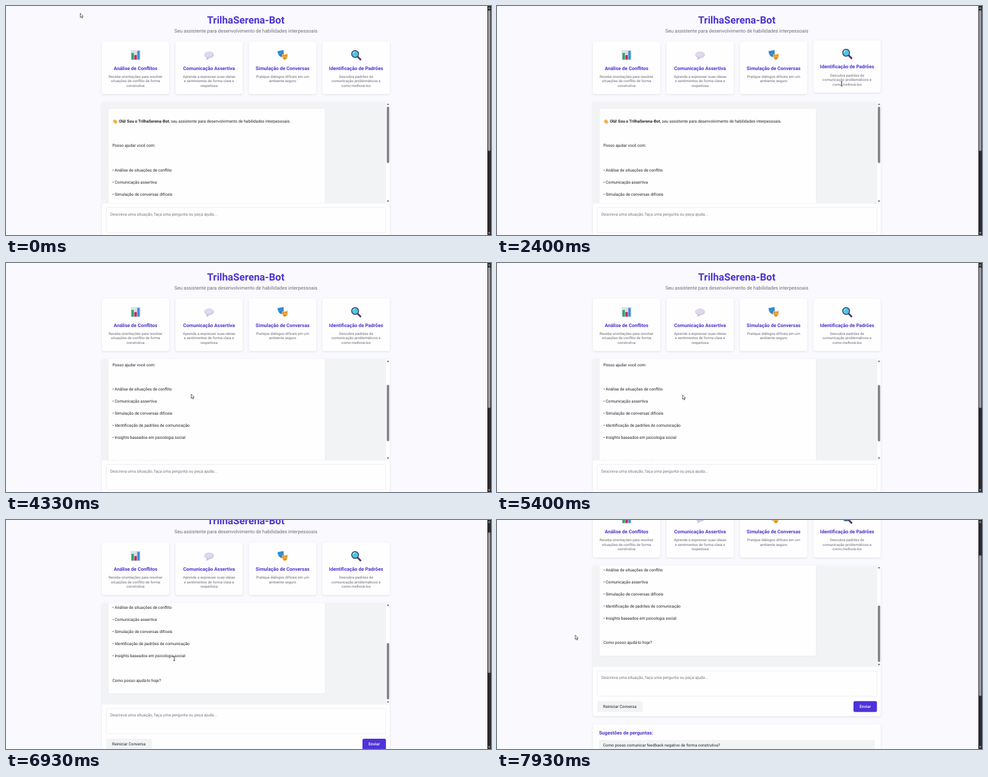
These frames come from a looping animation (800x379 px, 8 s). An HTML page:

```html
<!DOCTYPE html>
<html lang="pt-BR">
<head>
<meta charset="utf-8">
<title>Assistente</title>
<style>
  html, body { margin: 0; width: 100%; height: 100%; overflow: hidden; background: #faf9fe; }
  svg { display: block; }
  text { font: 6.667px Roboto, sans-serif; fill: #202126; text-rendering: geometricPrecision; white-space: pre; }
  .mid { text-anchor: middle; }
  .title { font-size: 16.667px; font-weight: 700; fill: #4c34d0; }
  .sub { font-size: 8px; fill: #6d6d76; }
  .head { font-size: 8px; font-weight: 700; fill: #4c34d0; }
  .desc { font-size: 6px; fill: #6d6d76; }
  .hint { fill: #76767c; }
  .send { fill: #fff; font-weight: 500; }
  .bold { font-weight: 700; }
  .box { fill: #fefeff; filter: drop-shadow(0 1.2px 1.4px rgba(30, 30, 60, .13)); }
  .grey { fill: #f1f3f4; }
  .line { fill: #fefeff; stroke: #e5e5ec; stroke-width: .6; }
</style>
</head>
<body>
<svg id="stage" width="800" height="379" viewBox="0 0 800 379"></svg>
<script>
const LOOP = 8000, STEP = 1000 / 15;
const LEFT = 158.1, WIDTH = 475, MID = 395.6;
const NOTCH = 31.4, CHAT_MAX = 104.8;

const rect = (x, y, w, h, r, cls, extra = '') =>
  `<rect x="${x}" y="${y}" width="${w}" height="${h}" rx="${r}" class="${cls}" ${extra}/>`;
const text = (x, y, s, cls = '') => `<text x="${x}" y="${y}" class="${cls}">${s}</text>`;
const tri = (x, y, d, fill) => `<path d="M${x - 2} ${y + d}h4l-2 ${-2.4 * d}z" fill="${fill}"/>`;

// Icons are drawn around their own centre.
const icons = [
  `<rect x="-8" y="-8.3" width="16" height="16.6" rx="1" fill="#dfe1e8"/>
   <path d="M-8-3h16M-8 2.5h16" stroke="#c3c8d3" stroke-width=".6"/>
   <rect x="-6.8" y="-3.5" width="4" height="11" fill="#2fa866"/>
   <rect x="-2" y="0" width="4" height="7.5" fill="#c8265d"/>
   <rect x="2.8" y="-7" width="4" height="14.5" fill="#3d8fdb"/>`,
  `<path d="M-3.5 3.5L-5 8L1 5z" fill="#c3b8d6"/>
   <ellipse cy="-.3" rx="8" ry="5.6" fill="#d5cbe4"/>
   <ellipse cx="-.6" cy="-1.2" rx="6.5" ry="4" fill="#e0d9ec"/>`,
  `<path d="M-8.5-6.5Q-4-7.5 1.5-8.5Q3.5 1-1.5 3.5Q-7.5 2-8.5-6.5z" fill="#3c93d6"/>
   <path d="M-6-3.7q1.2-1.2 2.3-.4M-2-4.5q1-1.2 2-.5M-4.7 0q2 .8 3.7-1.7" fill="none" stroke="#1c4d86" stroke-width=".9"/>
   <path d="M-1-1.5Q4-.8 8.5-2.5Q9.2 6.5 3.5 8.6Q-1.5 6-1-1.5z" fill="#f5b047"/>
   <path d="M.8 1.6q1-1 2 0M4.8 1.4q1-1 2-.2M1.8 5.6q2-2 4 0" fill="none" stroke="#8c5416" stroke-width=".9"/>`,
  `<path d="M3 3L7.2 7.3" stroke="#4d3a78" stroke-width="3" stroke-linecap="round"/>
   <circle cx="-1.6" cy="-1.8" r="5.7" fill="#4fc3e8" stroke="#37475c" stroke-width="1.5"/>
   <path d="M-5-2.5q.7-2.6 3.2-3" fill="none" stroke="#c9f0fb" stroke-width="1.1"/>`
];

const cards = [
  ['Análise de Conflitos', 'Receba orientações para resolver', 'situações de conflito de forma', 'construtiva'],
  ['Comunicação Assertiva', 'Aprenda a expressar suas ideias', 'e sentimentos de forma clara e', 'respeitosa'],
  ['Simulação de Conversas', 'Pratique diálogos difíceis em um', 'ambiente seguro'],
  ['Identificação de Padrões', 'Descubra padrões de', 'comunicação problemáticos e', 'como melhorá-los']
];

const card = ([head, ...lines], i) => {
  const x = LEFT + i * 121.25, c = x + 55.6;
  return `<g class="card">${rect(x, 58.8, 111.25, 86.9, 3.3, 'box')}
    <g transform="translate(${c} 81.2)">${icons[i]}</g>
    ${text(c, 105.5, head, 'mid head')}
    ${lines.map((s, n) => text(c, 119 + n * 7.4, s, 'mid desc')).join('')}</g>`;
};

// Message lines sit on a 20.06 px grid; the key is the row.
const message = {
  2: 'Posso ajudar você com:',
  4: '• Análise de situações de conflito',
  5: '• Comunicação assertiva',
  6: '• Simulação de conversas difíceis',
  7: '• Identificação de padrões de comunicação',
  8: '• Insights baseados em psicologia social',
  10: 'Como posso ajudá-lo hoje?'
};
const row = n => 193.3 + n * 20.06;

const chat = `<g id="chat">
  ${rect(168.6, 169.3, 358, 244.6, 2.5, 'line')}
  <path d="M176 190.5l1.2-.8 1-1.6 1.2-.3.6.7 1.2-.3 2.4 3.2-.3 2.2-1.8 1.2-2.5-.4z" fill="#f2b84b"/>
  <path d="M178.6 190.3l2 2.3M180 189.4l1.7 2.2" stroke="#c98a2a" stroke-width=".5"/>
  ${text(186.2, row(0), '<tspan class="bold">Olá! Sou o TrilhaSerena-Bot</tspan>, seu assistente para desenvolvimento de habilidades interpessoais.')}
  ${Object.entries(message).map(([n, s]) => text(175.4, row(+n), s)).join('')}
</g>`;

const panel = `
  ${rect(LEFT, 159, WIDTH, 249.5, 3.3, 'box')}
  <g clip-path="url(#view)">
    ${rect(LEFT, 159, 469, 167.3, 0, 'grey')}
    ${chat}
    ${tri(630.1, 162.6, 1.2, '#6a6a6a')}${tri(630.1, 323, -1.2, '#6a6a6a')}
    ${rect(628.1, 166.6, 4, 93.5, 2, '', 'id="chatThumb" fill="#858587"')}
  </g>
  <path d="M${LEFT} 326.4h${WIDTH}" stroke="#e8e8ee" stroke-width=".5"/>
  ${rect(165.4, 333.5, 461.2, 42, 2.5, 'line')}
  ${text(172, 346.8, 'Descreva uma situação, faça uma pergunta ou peça ajuda...', 'hint')}
  ${rect(165.2, 383.5, 75.2, 18, 2.5, 'grey')}
  ${text(202.6, 394.9, 'Reiniciar Conversa', 'mid')}
  ${rect(588, 383.5, 38.7, 18, 2.5, '', 'fill="#5032da"')}
  ${text(607.3, 394.9, 'Enviar', 'mid send')}
  ${rect(LEFT, 421.5, WIDTH, 120, 3.3, 'box')}
  ${text(168.2, 438.9, 'Sugestões de perguntas:', 'head')}
  ${rect(168.2, 447.8, 455, 18, 2.5, 'grey')}
  ${text(175, 459.2, 'Como posso comunicar feedback negativo de forma construtiva?')}`;

document.getElementById('stage').innerHTML = `
  <clipPath id="view"><path d="M${LEFT} 326.3V162.3q0-3.3 3.3-3.3h468.4q3.3 0 3.3 3.3v164z"/></clipPath>
  <rect width="800" height="379" fill="#faf9fe"/>
  <g id="page">
    ${text(MID, 28.6, 'TrilhaSerena-Bot', 'mid title')}
    ${text(MID, 43.6, 'Seu assistente para desenvolvimento de habilidades interpessoais', 'mid sub')}
    ${cards.map(card).join('')}
    ${panel}
  </g>
  <rect x="794" width="6" height="379" fill="#2b2b2e"/>
  ${tri(797, 3.2, 1.2, '#9b9b9e')}${tri(797, 375.8, -1.2, '#9b9b9e')}
  ${rect(795, 7, 4, 233, 2, '', 'id="pageThumb" fill="#9b9b9e"')}
  <path id="arrow" d="M0 0V7L1.6 5.5L2.8 8.1L4 7.6L2.9 5.1H5z" fill="#fff" stroke="#222" stroke-width=".7" stroke-linejoin="round"/>
  <path id="beam" d="M-1.4-3.5H1.4M0-3.5V3.5M-1.4 3.5H1.4" fill="none" stroke="#222" stroke-width=".8"/>`;

// Pointer path: time, x, y, and 1 while it is a text caret.
const path = [
  [60, 122.5, 12, 0], [860, 184, 84, 0], [1400, 241, 74, 0], [1750, 262, 95, 0],
  [2100, 535, 112, 0], [2250, 558, 122, 1], [2400, 568.5, 128.7, 1], [2600, 572, 133, 1],
  [2730, 548, 147, 0], [3000, 400, 195, 0], [3330, 305.5, 217, 0], [5330, 305.5, 217, 0],
  [5400, 306, 218.5, 0], [5600, 306, 218.5, 0], [6200, 255.3, 218.5, 0], [6600, 258, 221, 0],
  [6730, 270, 227, 1], [6930, 277.5, 229.5, 1], [7070, 272, 228, 0], [7400, 190, 205, 0],
  [7660, 129, 192, 0], [7930, 129, 190.5, 0]
];
// Hover spans, one per card.
const hovers = [[800, 1760], [1772, 1914], [1928, 2070], [2083, 2720]];
// Wheel notches: start, duration, distance.
const chatWheel = [[3110, 300, NOTCH], [3950, 430, NOTCH], [5760, 400, NOTCH], [6590, 200, CHAT_MAX - 3 * NOTCH]];
const pageWheel = [[6810, 280, NOTCH], [7150, 280, NOTCH], [7815, 280, NOTCH]];

const clamp = v => Math.min(1, Math.max(0, v));
const smooth = v => v * v * (3 - 2 * v);
const easeOut = v => 1 - (1 - v) ** 2;
const scrolled = (wheel, t) => wheel.reduce((sum, [at, dur, d]) => sum + d * easeOut(clamp((t - at) / dur)), 0);
const lift = ([from, to], t) =>
  smooth(clamp((Math.min(t, to) - from) / 200)) * (1 - smooth(clamp((t - to) / 200)));

function pointer(t) {
  const n = path.findIndex(p => p[0] > t);
  if (n < 0) return path[path.length - 1].slice(1);
  const b = path[n], a = path[Math.max(0, n - 1)];
  const k = n ? (t - a[0]) / (b[0] - a[0]) : 0;
  return [a[1] + (b[1] - a[1]) * k, a[2] + (b[2] - a[2]) * k, a[3]];
}

const $ = id => document.getElementById(id);
const move = (el, x, y) => el.setAttribute('transform', `translate(${x.toFixed(2)} ${y.toFixed(2)})`);
const cardEls = [...document.querySelectorAll('.card')];
const [page, chatEl, chatThumb, pageThumb, arrow, beam] =
  ['page', 'chat', 'chatThumb', 'pageThumb', 'arrow', 'beam'].map($);

function draw(ms) {
  const t = Math.min(119, Math.floor((ms % LOOP + 8) / STEP)) * STEP;
  const inner = scrolled(chatWheel, t), outer = scrolled(pageWheel, t);
  move(page, 0, -outer);
  move(pageThumb, 0, outer * .612);
  move(chatEl, 0, -inner);
  move(chatThumb, 0, inner * .559);
  cardEls.forEach((el, i) => move(el, 0, -2.08 * lift(hovers[i], t)));
  const [x, y, caret] = pointer(t);
  move(arrow, x, y);
  move(beam, x, y);
  arrow.style.display = caret ? 'none' : '';
  beam.style.display = caret ? '' : 'none';
}

const start = performance.now();
function tick() {
  draw(performance.now() - start);
  requestAnimationFrame(tick);
}
tick();
</script>
</body>
</html>
```
